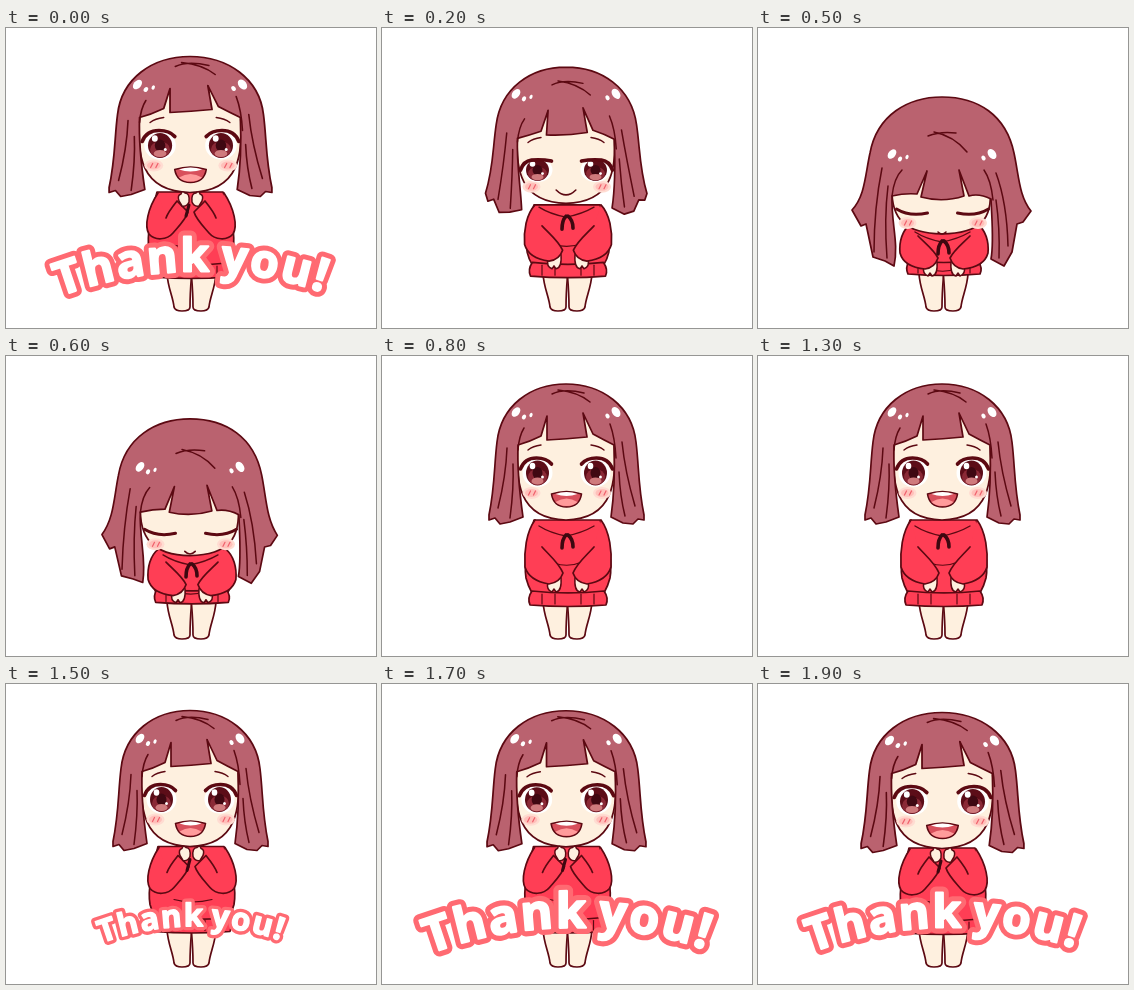
Write an HTML page that moves like this. It is 370 px wide and 300 px high and loops after 2 s.

```html
<!DOCTYPE html>
<html lang="en">
<head>
<meta charset="utf-8">
<title>Thank you!</title>
<style>
html, body { margin: 0; width: 100%; height: 100%; overflow: hidden; background: #fff; }
svg { display: block; width: 100%; height: 100%; }
.msg { font: 800 46px "Noto Sans", "Open Sans", sans-serif; letter-spacing: 2.1px; word-spacing: -5px; text-anchor: middle; stroke-linejoin: round; }
</style>
</head>
<body>
<svg id="stage" viewBox="0 0 370 300">
  <defs><path id="arc" d="M8 290A390 390 0 0 1 368 285"/></defs>
  <g id="girl" stroke-linejoin="round" stroke-linecap="round"></g>
  <g id="banner" class="msg">
    <text fill="#ff6a72" stroke="#ff6a72" stroke-width="12"><textPath href="#arc" startOffset="50%">Thank you!</textPath></text>
    <text fill="#fff" stroke="#fff" stroke-width="2.2"><textPath href="#arc" startOffset="50%">Thank you!</textPath></text>
  </g>
</svg>
<script>
const STEP = 100, COUNT = 20;
const LINE = '#5c0912', SKIN = '#fef0df', RED = '#ff3e55', HAIR = '#ba626f';
// Depth of the bow and size of the banner for every step of the loop
const bows = [0, 0, .27, .6, .9, 1, .85, .35, 0, .5, 1, .9, .35, 0, 0, 0, 0, 0, 0, 0];
const sizes = [1, 1.09, 0, 0, 0, 0, 0, 0, 0, 0, 0, 0, 0, 0, .3, .68, 1.09, 1.05, 1.02, 1];

// Each pair: upright shape, bowed shape
const shapes = {
  torso: ['M152 164C148 180 141 205 144 222Q146 230 150 237L222 237Q226 230 228 222C231 205 224 180 218 164Z',
          'M152 196C148 208 146 220 147 228Q148 234 151 237L221 237Q224 234 225 228C226 220 224 208 218 196Z'],
  hem: ['M150 235Q186 239 222 235Q227 242 224 249Q186 252 148 249Q145 242 150 235Z',
        'M151 233Q186 236 220 233Q225 240 222 246Q186 249 150 246Q147 240 151 233Z'],
  arm: ['M153 164C144 176 142 196 143 211C146 221 155 226 167 228C174 227 179 223 181 217C177 207 168 200 160 191',
        'M153 196C144 202 141 214 142 225C145 236 156 240 167 241C174 240 178 236 180 230C176 222 168 216 160 208'],
  face: ['M136 85C133 125 136 163 184 164C232 163 235 125 232 85L205 54L162 57Z',
         'M134 160C133 192 148 205 184 206C222 205 235 192 232 160L206 138L164 140Z'],
  hair: ['M184 28C148 28 119 50 115 86C112 110 113 130 107 159L107 164L113 162L118 168L128 166L141 161' +
         'C138 140 135 115 136 89Q147 86 159 80L165 60L165 84Q185 83 205 81L201 57L211 78Q222 84 232 89' +
         'C233 115 232 140 229 161L241 167L251 168L256 163L262 164L262 159C256 130 257 110 254 86C250 50 220 28 184 28Z',
         'M184 69C150 69 119 87 112 125C107 148 107 168 94 182L103 198L108 196L115 229L127 233L136 238' +
         'C141 215 133 195 134 168Q147 165 159 166L169 143L163 169Q185 175 206 168L201 142L211 168Q221 165 233 171' +
         'C234 195 236 215 233 231L246 238L254 224L259 196L265 194L273 183C261 168 261 148 256 125C248 87 220 69 184 69Z'],
  locks: ['M142 72Q137 80 136 94M125 92Q124 120 116 152M131 108Q132 132 128 162M228 68Q233 82 234 102M240 86Q243 116 253 150M237 116Q238 140 243 160',
          'M144 142Q136 150 134 168M124 140Q116 180 116 224M130 158Q126 190 129 230M226 142Q233 152 235 172M238 145Q249 175 250 218M238 172Q242 200 241 230'],
  crown: ['M170 38Q182 32 202 37M176 34Q196 36 208 46',
          'M170 108Q182 103 198 105M176 104Q196 108 209 124']
};

const RAISED = 'M153 165C143 180 139 198 144 206C150 213 162 212 168 205C174 198 181 191 183 184L172 173C168 178 163 184 161 190';
const MITT = 'M174 173Q172 167 176 166Q177 162 180 165Q185 165 184 174Q182 179 177 178Z';

const girl = document.getElementById('girl');
const banner = document.getElementById('banner');
const mix = (a, b, t) => a + (b - a) * t;

function morph([from, to], t) {
  const end = to.match(/\d+/g);
  let i = 0;
  return from.replace(/\d+/g, n => mix(+n, +end[i++], t).toFixed(2));
}

const path = (d, fill = 'none', width = 1.7, stroke = LINE) =>
  `<path d="${d}" fill="${fill}" stroke="${stroke}" stroke-width="${width}"/>`;
const oval = (x, y, rx, ry, fill, turn = 0) =>
  `<ellipse cx="${x}" cy="${y}" rx="${rx}" ry="${ry}" fill="${fill}" transform="rotate(${turn} ${x} ${y})"/>`;
const group = (move, body) => `<g transform="${move}">${body}</g>`;
const both = (body, axis = 186) => body + group(`translate(${axis * 2} 0) scale(-1 1)`, body);

function legs() {
  return both(path('M161 246C162 260 167 269 168 279Q169 283 176 283Q184 283 184 279Q184 266 185.5 248', SKIN), 185.5);
}

function clothes(b, raised) {
  const e = b ** .7;
  const top = mix(168, 202, b);
  const y = mix(238, 235, b);
  let out = path(morph(shapes.torso, e), RED) + path(morph(shapes.hem, b), RED);
  for (const x of [160, 173, 199, 212]) out += path(`M${x} ${y}v10`, 'none', 1.2);
  if (raised) return out + path('M168 217Q186 222 206 217', 'none', 1.2) + both(path(RAISED, RED));
  const hand = path('M166 226Q164 234 170 236L172 233L174 236Q180 235 179 222', SKIN, 1.5);
  out += path(`M172 ${top + 39}Q186 ${top + 44} 200 ${top + 38}`, 'none', 1.2);
  out += group(`translate(0 ${12 * e})`, both(hand));
  out += both(path(morph(shapes.arm, e), RED));
  out += path(`M157 ${top + 2}Q168 ${top + 9} 184 ${top + 12}Q200 ${top + 9} 212 ${top + 2}`, 'none', 1.4);
  return out + path(`M184 ${top + 11}Q180 ${top + 15} 180 ${top + 24}M186 ${top + 11}Q191 ${top + 15} 191 ${top + 23}`, 'none', 3.6, '#3d0810');
}

// side: 1 for the left eye, -1 for the right one
function eye(x, y, b, side) {
  const at = `translate(${x} ${y})`, flip = `scale(${side} 1)`;
  if (b > .45) return group(at + flip, path('M-17 -3Q-4 5 14 1', 'none', 3));
  const half = b > .1;
  const ball = oval(0, 0, 15, 14, '#fff') +
    oval(0, 0, 11.5, 12.5, '#5c0d18') + oval(0, 4, 9.5, 8, '#8a2936') +
    oval(0, 0, 5, 6, '#3f0812') + oval(0, 8, 6, 3.6, '#cf7a7d') +
    oval(-5, -7, 2.8, 3.2, '#fff') + oval(5, 4, 1.4, 1.6, '#fff');
  const lash = half ? 'M-17 0Q-14 -9 -6 -10Q4 -11 14 -9' : 'M-17 -4Q-13 -15 -1 -15Q9 -15 14 -9';
  return group(at, group(`scale(1 ${half ? .86 : 1})`, ball) + group(flip, path(lash, 'none', 3.6)));
}

function mouth(b, raised) {
  if (b > .1) {
    const y = mix(162, 204, Math.max(0, (b - .27) / .73));
    const w = mix(12, 4, b);
    return path(`M${184 - w} ${y}Q184 ${y + w} ${184 + w} ${y}`, 'none', 1.6);
  }
  const body = path('M-15 0Q0 -5 15 0Q13 13 0 13Q-13 13 -15 0Z', '#d8505c', 1.6) +
    path('M-11 8Q0 1 11 8Q7 12 0 12Q-7 12 -11 8Z', '#ff9b9b', 0, 'none') +
    path('M-11 0Q0 -4 11 0Q0 4 -11 0Z', '#fff', 0, 'none');
  return group(`translate(184.5 ${raised ? 141 : 138})`, body);
}

function cheek(x, y) {
  return oval(x, y, 9, 6, '#ffdcd2') + oval(x, y, 6.5, 4, '#ffc0ba') +
    path(`M${x - 3} ${y + 2}l2 -4M${x + 2} ${y + 2}l2 -4`, 'none', 1.2, '#f0606c');
}

function head(b, raised) {
  const e = b ** .75;
  const eyeY = mix(117, 184, e), cheekY = mix(137, 195, e);
  const brow = mix(92, 168, b);
  let out = path(morph(shapes.face, b), SKIN);
  out += cheek(149.5, cheekY) + cheek(220, cheekY);
  out += eye(155.5, eyeY, b, 1) + eye(213.5, eyeY, b, -1) + mouth(b, raised);
  out += path(morph(shapes.hair, b), HAIR) + path(morph(shapes.locks, b) + morph(shapes.crown, b), 'none', 1.5);
  if (b < .45) out += path(`M146 ${brow + 2}Q151 ${brow - 2} 159 ${brow - 3}M209 ${brow - 3}Q217 ${brow - 2} 222 ${brow + 2}`, 'none', 1.4);
  const shine = oval(134, 56, 3.6, 5.4, '#fff', 38) + oval(142, 61, 2, 2.6, '#fff', 30) + oval(149, 59, 1.5, 2.2, '#fff', 25) +
    oval(234, 56, 3.8, 5.6, '#fff', -35) + oval(225.5, 60, 2, 2.6, '#fff', -30);
  return out + group(`translate(0 ${70 * b ** 1.5})`, shine);
}

function draw(time) {
  const i = Math.floor(time / STEP) % COUNT;
  const b = bows[i], size = sizes[i];
  const raised = i < 2 || i >= 14;
  // The hair swings out a little while the banner settles
  const swing = !raised ? 0 : i < 2 || i === 19 ? 1 : Math.max(0, (i - 15) / 4);
  const lift = raised && swing < 1 ? -1.5 : 0;
  const spread = 1 + swing * .05;
  girl.innerHTML = legs() + group(`translate(${-swing} ${lift})`, clothes(b, raised)) +
    group(`translate(${184.5 * (1 - spread)} ${lift + swing * .5}) scale(${spread} 1)`, head(b, raised)) +
    (raised ? group(`translate(${-swing} ${lift})`, both(path(MITT, SKIN, 1.5), 185.5) + path('M184 177L181 188', 'none', 3, '#3d0810')) : '');
  banner.style.display = size ? '' : 'none';
  banner.setAttribute('transform', `translate(184.5 240) scale(${size || 1}) translate(-186 -240)`);
}

const start = performance.now();
function tick() {
  draw(performance.now() - start);
  requestAnimationFrame(tick);
}
tick();
</script>
</body>
</html>
```
